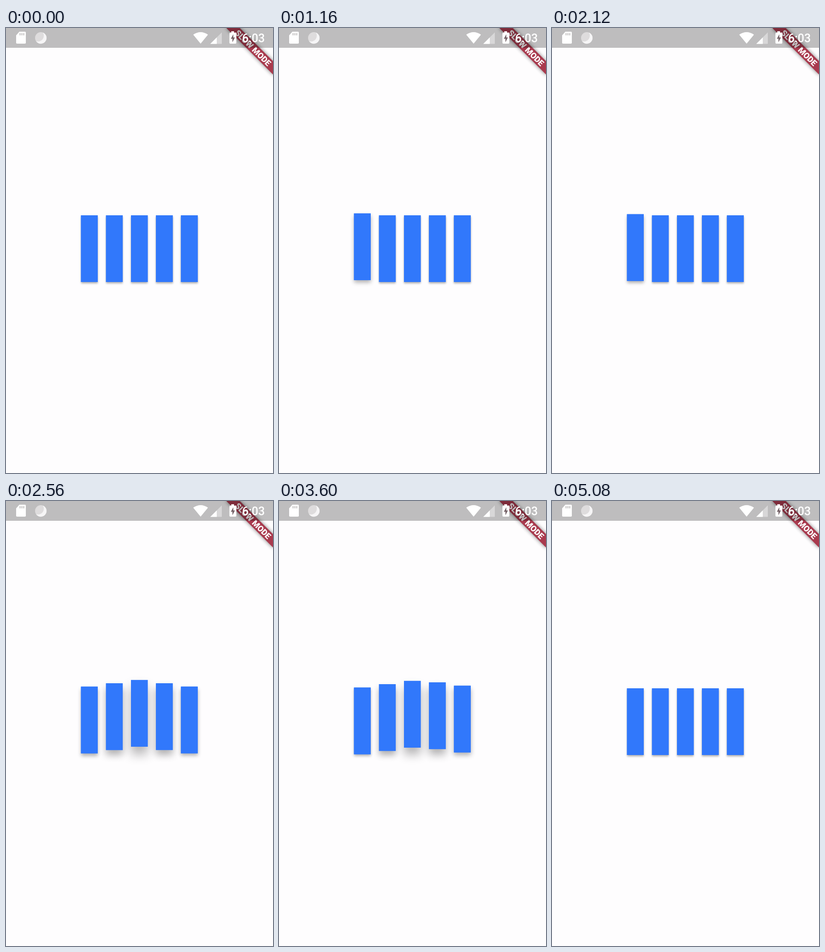
Animation of 579x967 px, one loop 5.12 s. Source, as an HTML page with a canvas:

```html
<!DOCTYPE html>
<html lang="en">
<head>
<meta charset="utf-8">
<title>Bar wave loader</title>
<style>
  html, body { margin: 0; width: 100%; height: 100%; overflow: hidden; background: #fefdfe; }
  canvas, svg { position: absolute; left: 0; top: 0; display: block; }
  text { font-family: Roboto, "Noto Sans", sans-serif; fill: #fff; }
</style>
</head>
<body>
<canvas width="579" height="967"></canvas>
<svg width="579" height="967" viewBox="0 0 579 967">
  <defs>
    <filter id="soft" x="-20%" y="-100%" width="140%" height="300%">
      <feGaussianBlur stdDeviation="4.5"/>
    </filter>
  </defs>

  <!-- corner ribbon -->
  <g transform="translate(579 0) rotate(45)">
    <rect x="-72" y="51" width="144" height="20.5" opacity=".5" filter="url(#soft)"/>
    <rect x="-72" y="51" width="144" height="20.5" fill="#a93a4e"/>
    <text x="0" y="67.6" font-size="17.8" font-weight="900" text-anchor="middle">SLOW MODE</text>
  </g>

  <!-- status bar -->
  <rect width="579" height="43" fill="#000" fill-opacity=".255"/>
  <path d="M29 8H41q2 0 2 2V32q0 2-2 2H24q-2 0-2-2V16Z" fill="#fff"/>
  <path d="M30.5 11v5M34.5 11v5M38.5 11v5" stroke="#bfbdbe" stroke-width="2"/>
  <circle cx="75.500" cy="21.500" r="12.500" fill="#dedcdd"/>
  <path d="M80 10A12.500 12.500 0 1 1 65 28.500A12.500 12.500 0 0 0 80 10Z" fill="#f6f5f6"/>
  <path d="M422 34L406 14.500Q422 3.500 438 14.500Z" fill="#fff"/>
  <path d="M443 34.500L468 9.500V34.500Z" fill="#fff" opacity=".4"/>
  <path d="M443 34.500L457 20.500V34.500Z" fill="#fff"/>
  <path d="M488.500 7h6v3h3q2 0 2 2V32q0 2-2 2H486.500q-2 0-2-2V12q0-2 2-2h2Z" fill="#fff"/>
  <path d="M493 13.500L487.500 23.500H491V31L496.500 20.500H493Z" fill="#77656a"/>
  <text x="512" y="30.500" font-size="25" font-weight="500">6:03</text>
</svg>

<script>
const ctx = document.querySelector('canvas').getContext('2d');
const LOOP = 5120, STEP = 40;
const PASS = 850;                                // one wave crossing, ms
const STARTS = [24, 1038, 2038, 3056, 4140];
const BARS = [0, 1, 2, 3, 4];
const LIFT = 18.1, FALLOFF = 0.4;

// Position of the wave's peak, counted in bars; it gains speed on its way.
function crest(t) {
  const start = STARTS.filter(s => s <= t).pop() ?? -PASS;
  const progress = Math.min(1, (t - start) / PASS);
  return -2.5 + 9 * progress ** 1.42;
}

function bar(i, lift) {
  ctx.fillRect(162.6 + 54.2 * i, 407 - lift, 36.3, 145);
}

function draw(t) {
  const peak = crest(t);
  const lifts = BARS.map(i => LIFT * Math.max(0, 1 - FALLOFF * Math.abs(i - peak)));
  ctx.clearRect(0, 0, 579, 967);
  ctx.fillStyle = '#3178fb';
  lifts.forEach((lift, i) => {
    ctx.shadowColor = 'rgba(0,0,0,.3)';
    ctx.shadowOffsetY = 2.5 + 0.75 * lift;
    ctx.shadowBlur = 4 + 1.1 * lift;
    bar(i, lift);
  });
  // Repaint the faces so that no shadow falls on a neighbour.
  ctx.shadowColor = 'transparent';
  lifts.forEach((lift, i) => bar(i, lift));
}

function tick() {
  const t = performance.now() % LOOP;
  draw(Math.floor(t / STEP) * STEP);
  requestAnimationFrame(tick);
}
tick();
</script>
</body>
</html>
```
